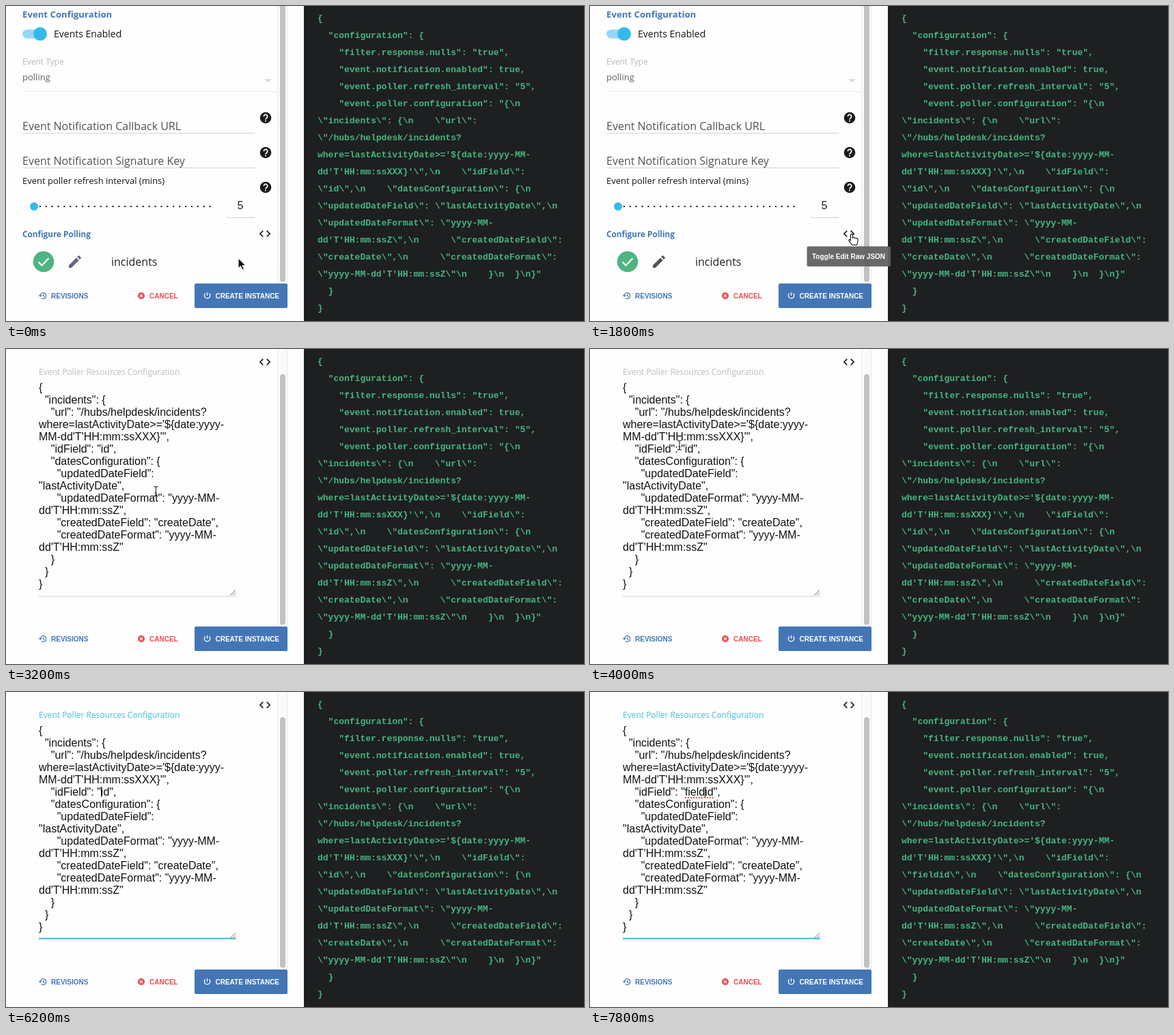
An HTML page that plays this animation: 846 by 462 pixels, repeating every 8 s.

```html
<!DOCTYPE html>
<html lang="en">
<head>
<meta charset="utf-8">
<title>Polling configuration</title>
<style>
html, body { margin: 0; width: 100%; height: 100%; overflow: hidden; background: #fefefe; }
svg { display: block; width: 846px; height: 462px; }
text { white-space: pre; font-family: "Open Sans", sans-serif; }
.head { font-weight: 700; fill: #4376b4; }
.field { font-size: 16px; fill: #505456; }
.btn { font: bold 10px "Liberation Sans", Arial, sans-serif; }
.area text { font: 16px "Liberation Sans", Arial, sans-serif; fill: #111; }
.code text { font: bold 13px "Liberation Mono", "Courier New", monospace; fill: #46b682; }
</style>
</head>
<body>
<svg viewBox="0 0 846 462">
  <defs>
    <path id="chevrons" d="M-2.6 4.6-7.2 0l4.6-4.6L-4-6l-6 6 6 6zM2.6 4.6 7.2 0 2.6-4.6 4-6l6 6-6 6z" fill="#1c1c1c" transform="scale(.83)"/>
    <g id="help">
      <circle r="8.3" fill="#1a1a1a"/>
      <path d="M-2.7-2A2.7 2.7 0 1 1 1.5.2C.4 1 0 1.300 0 2.500" fill="none" stroke="#fff" stroke-width="1.700"/>
      <rect x="-.9" y="3.600" width="1.800" height="1.800" fill="#fff"/>
    </g>
  </defs>
  <rect width="846" height="462" fill="#fefefe"/>

  <g id="form">
    <text class="head" x="24" y="17" font-size="13.2">Event Configuration</text>
    <rect x="24" y="34.500" width="34" height="13" rx="6.500" fill="#94d8f3"/>
    <circle cx="50" cy="41" r="10" fill="#34b9ef"/>
    <text x="70" y="46" font-size="14" fill="#151515">Events Enabled</text>
    <text x="24" y="86" font-size="12" fill="#b9b9b9">Event Type</text>
    <text x="24" y="109" font-size="13" fill="#606060">polling</text>
    <path d="M378 107h11l-5.500 5z" fill="#dcdcdc"/>
    <path d="M24 125.500H397" stroke="#e9e9e9"/>
    <text class="field" x="24" y="182">Event Notification Callback URL</text>
    <text class="field" x="24" y="233">Event Notification Signature Key</text>
    <path d="M24 186.500H364M24 237.500H364M323 310.500H364" stroke="#d2d2d2"/>
    <use href="#help" x="380" y="164"/>
    <use href="#help" x="380" y="215"/>
    <use href="#help" x="380" y="266"/>
    <text x="24" y="261" font-size="13" fill="#151515">Event poller refresh interval (mins)</text>
    <g id="ticks" fill="#111"></g>
    <circle cx="41" cy="294" r="6" fill="#34b9ef"/>
    <text x="338.500" y="298" font-size="16" fill="#222" style="font-family:'Liberation Sans',sans-serif">5</text>
    <text class="head" x="24" y="339" font-size="11.75">Configure Polling</text>
    <circle cx="55" cy="375" r="15.300" fill="#4eb482"/>
    <path d="M47.500 375.500l5 5 10-10.500" fill="none" stroke="#fff" stroke-width="2.200"/>
    <path id="pencil" transform="translate(89 363)" d="M3 17.250V21h3.750L17.810 9.940l-3.750-3.750zM20.710 7.040c.39-.39.39-1.020 0-1.410l-2.340-2.340a1 1 0 0 0-1.410 0l-1.830 1.830 3.750 3.750z"/>
    <text x="154" y="381" font-size="16" fill="#222">incidents</text>
  </g>

  <g id="raw">
    <text id="label" x="48" y="38" font-size="12">Event Poller Resources Configuration</text>
    <g id="area" class="area"></g>
    <path d="M48 362.500H336" stroke="#d2d2d2"/>
    <path id="focus" stroke="#45bedd" stroke-width="2"/>
    <path d="M328.500 361l7.500-7.500M332.500 361l3.500-3.500" stroke="#666"/>
    <path id="squiggle" stroke="#e8493f" stroke-width="2" stroke-dasharray="2 2"/>
    <path id="caret" stroke="#111"/>
  </g>

  <circle id="ripple" cx="379" fill="#8a8a8a"/>
  <use id="toggle" href="#chevrons" x="379"/>

  <rect x="397" width="15" height="407" fill="#fafafa"/>
  <path d="M397.500 0V407M411.500 0V407" stroke="#e9e9e9"/>
  <rect id="thumb" x="401" width="8" rx="4" fill="#c1c1c1"/>

  <rect y="407" width="436" height="55" fill="#fefefe"/>
  <g fill="none" stroke="#4376b4" stroke-width="1.200">
    <path d="M50.300 425a4.300 4.300 0 1 1 1.300 3.100M48.300 424l2 2 2-2M54.600 422.500v2.700l2 1.300"/>
  </g>
  <text class="btn" x="66" y="429" fill="#4376b4">REVISIONS</text>
  <circle cx="198" cy="425" r="5" fill="#ee4b4e"/>
  <path d="M196 423l4 4m0-4l-4 4" stroke="#fff" stroke-width="1.200"/>
  <text class="btn" x="210" y="429" fill="#ee4b4e">CANCEL</text>
  <rect x="276" y="407" width="136" height="36" rx="2" fill="#4476b6"/>
  <path d="M294.500 420v5M291.700 421.500a4.200 4.200 0 1 0 5.600 0" fill="none" stroke="#fff" stroke-width="1.200"/>
  <text class="btn" x="306.500" y="429" fill="#fff">CREATE INSTANCE</text>

  <rect x="436" width="410" height="462" fill="#1e1f21"/>
  <g id="code" class="code"></g>

  <g id="tip">
    <rect x="317.500" y="352.500" width="122.500" height="29.500" rx="2" fill="#616161" fill-opacity=".95"/>
    <text class="btn" x="325" y="371" fill="#fff">Toggle Edit Raw JSON</text>
  </g>

  <path id="arrow" d="M0 0V14.500L3.400 11.400 5.800 17 8.300 15.900 5.900 10.500H10.500Z" fill="#111" stroke="#fff"/>
  <path id="hand" d="M-1.500 1.200Q0-.8 1.500 1.200V6Q3 4.800 4.200 6.400 5.800 5.300 6.800 7 8.800 6.300 9 8.500V12Q8.500 14.500 7.500 16.500H.5Q-1.500 13.500-4 10.300-4.700 8.300-2.800 8.500L-1.500 9.800Z" fill="#fff" stroke="#111" stroke-width="1.100"/>
  <g id="beam" fill="none">
    <path d="M-3-7Q0-7 0-5V5Q0 7-3 7M3-7Q0-7 0-5M0 5Q0 7 3 7M-1.500 2.500H1.500" stroke="#222" stroke-width="1.100"/>
  </g>
</svg>
<script>
const NS = "http://www.w3.org/2000/svg";
const LOOP = 8000;
const $ = id => document.getElementById(id);
const set = (id, attrs) => { for (const k in attrs) $(id).setAttribute(k, attrs[k]); };
const show = (id, on) => set(id, { visibility: on ? "visible" : "hidden" });
const span = (t, a, b) => Math.min(1, Math.max(0, (t - a) / (b - a)));
const ease = x => x * x * (3 - 2 * x);

function add(parent, tag, attrs, text = "") {
  const el = document.createElementNS(NS, tag);
  for (const k in attrs) el.setAttribute(k, attrs[k]);
  el.textContent = text;
  return parent.appendChild(el);
}

const addLines = (id, x, y, step, source) => source.split("\n")
  .map((line, i) => add($(id), "text", { x, y: y + i * step }, line));

const rawLines = addLines("area", 48, 62, 18, `{
  "incidents": {
    "url": "/hubs/helpdesk/incidents?
where=lastActivityDate>='\${date:yyyy-
MM-dd'T'HH:mm:ssXXX}'",
    "idField": "id",
    "datesConfiguration": {
      "updatedDateField":
"lastActivityDate",
      "updatedDateFormat": "yyyy-MM-
dd'T'HH:mm:ssZ",
      "createdDateField": "createDate",
      "createdDateFormat": "yyyy-MM-
dd'T'HH:mm:ssZ"
    }
  }
}`);

const codeLines = addLines("code", 456, 22, 25, String.raw`{
  "configuration": {
    "filter.response.nulls": "true",
    "event.notification.enabled": true,
    "event.poller.refresh_interval": "5",
    "event.poller.configuration": "{\n
\"incidents\": {\n    \"url\":
\"/hubs/helpdesk/incidents?
where=lastActivityDate>='$${""}{date:yyyy-MM-
dd'T'HH:mm:ssXXX}'\",\n    \"idField\":
\"id\",\n    \"datesConfiguration\": {\n
\"updatedDateField\": \"lastActivityDate\",\n
\"updatedDateFormat\": \"yyyy-MM-
dd'T'HH:mm:ssZ\",\n      \"createdDateField\":
\"createDate\",\n      \"createdDateFormat\":
\"yyyy-MM-dd'T'HH:mm:ssZ\"\n    }\n  }\n}"
  }
}`);

for (let i = 1; i < 30; i++)
  add($("ticks"), "rect", { x: 40 + i * 8.88, y: 293, width: 2, height: 2 });

const OPEN = 2400, FOCUS = 5200, TYPE = 6600, KEY = 200, WORD = "field";
const prefix = '    "idField": "';

// Pointer legs: start, end, from, to
const legs = [
  [200, 1200, [340, 370], [383, 334]],
  [2600, 3600, [383, 334], [131, 141]],
  [4000, 4800, [131, 141], [137, 146]],
  [5000, 5200, [137, 146], [140, 146]]
];

function pointer(t) {
  let p = legs[0][2];
  for (const [a, b, from, to] of legs) {
    if (t < a) break;
    const k = ease(span(t, a, b));
    p = from.map((v, i) => v + (to[i] - v) * k);
  }
  return p;
}

let typed = null;
function type(word) {
  if (word === typed) return;
  typed = word;
  rawLines[5].textContent = `${prefix}${word}id",`;
  codeLines[10].textContent = String.raw`\"${word}id\",\n    \"datesConfiguration\": {` + "\\n";
}

function drawPointer(t) {
  const [x, y] = pointer(t);
  const inArea = t > OPEN && x < 336;
  const onToggle = t < OPEN && x > 370;
  const kind = inArea ? "beam" : onToggle ? "hand" : "arrow";
  for (const id of ["arrow", "hand", "beam"]) {
    show(id, id === kind && t < 5800);
    set(id, { transform: `translate(${x} ${y})` });
  }
}

function drawRaw(t) {
  const count = t < TYPE ? 0 : Math.min(WORD.length, Math.floor((t - TYPE) / KEY) + 1);
  type(WORD.slice(0, count));

  const focused = t >= FOCUS;
  const grow = 144.5 * ease(span(t, FOCUS, FOCUS + 300));
  set("label", { fill: focused ? "#45bedd" : "#bcbcbc" });
  set("focus", { d: `M${192.5 - grow} 361.500H${192.5 + grow}` });

  const line = rawLines[5], open = t >= OPEN;
  const x = n => 48 + line.getSubStringLength(0, n);
  const blink = t >= TYPE || Math.floor((t - FOCUS) / 500) % 2 === 0;
  set("caret", { d: `M${Math.round(x(prefix.length + count)) + .5} 139V154` });
  show("caret", open && focused && blink);
  set("squiggle", { d: `M${x(prefix.length)} 155H${x(prefix.length + count + 2)}` });
  show("squiggle", t >= 7600);
}

function draw(t) {
  const open = t >= OPEN;
  show("form", !open);
  show("raw", open);
  set("toggle", { y: open ? 19 : 334 });
  set("thumb", open ? { y: 37, height: 367.5 } : { y: -10, height: 414.5 });
  set("pencil", { fill: t < 800 ? "#6c5f8c" : "#555" });
  set("tip", { opacity: open ? 0 : span(t, 1200, 1400) });
  set("ripple", {
    cy: open ? 14 : 329,
    r: 18 * ease(span(t, 2200, 2400)),
    opacity: .45 * (1 - span(t, 2450, 2800))
  });
  drawRaw(t);
  drawPointer(t);
}

const begin = performance.now();
function tick() {
  draw((performance.now() - begin) % LOOP);
  requestAnimationFrame(tick);
}
tick();
</script>
</body>
</html>
```
